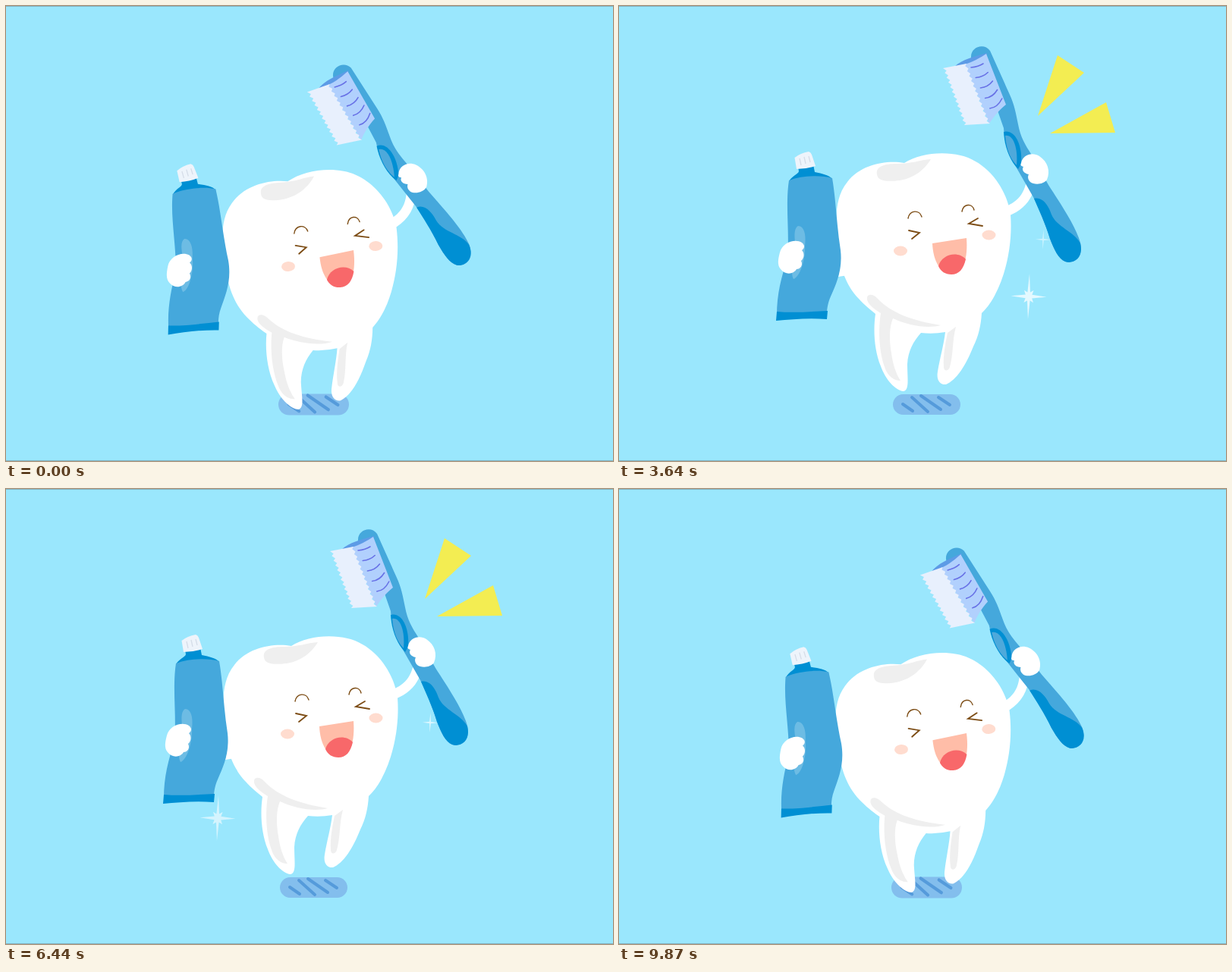
Recreate the animation shown at these times as an HTML page. Size 800 by 600 pixels, loop 9.94 s.

```html
<!DOCTYPE html>
<html lang="en">
<head>
<meta charset="utf-8">
<title>Jumping tooth</title>
<style>
  html, body { margin: 0; width: 100%; height: 100%; overflow: hidden; background: #9ae7fd; }
  svg { display: block; width: 100vw; height: 100vh; }
  .white { fill: #fff; }
  .blue { fill: #45a8dc; }
  .deep { fill: #008fd3; }
  .shade { fill: #efefef; }
  .line { fill: none; stroke: #7c4c14; stroke-width: 1.4; stroke-linecap: round; }
</style>
</head>
<body>
<svg viewBox="0 0 800 600">
  <path d="M0 .5H800M0 599.5H800" stroke="#83b3c2"/>

  <g id="shadow">
    <rect x="361" y="512" width="89" height="27" rx="13.5" fill="#83beed"/>
    <path d="M374 525l13 9M386 516l21 19M398 514l26 18M421 516l15 10" stroke="#559bdb" stroke-width="4" stroke-linecap="round"/>
  </g>

  <g id="brush">
    <path class="white" d="M505 266C526 259 533 248 537 232L548 238C543 259 530 271 508 279Z"/>
    <path class="blue" d="M464 68C463 54 481 48 489 59L515 117C521 130 523 141 526 156C529 173 536 184 543 195L566 236C580 258 602 290 608 312C612 331 599 340 588 337C579 333 574 322 568 307C562 287 554 268 546 252L522 210C511 193 508 177 507 161L499 138Z"/>
    <path class="deep" d="M547 254C558 251 566 263 570 275C577 292 600 297 608 313C613 332 599 341 588 337C579 333 574 322 568 307C562 287 553 268 547 254Z"/>
    <path class="deep" d="M507 166C522 162 532 184 530 208L526 215C514 203 508 184 507 166Z"/>
    <path fill="#4ea9db" d="M509 171C520 169 526 188 524 210C514 200 510 185 509 171Z"/>
    <path fill="#5d9be6" d="M442 80C453 70 467 67 485 62L482 78Z"/>
    <path fill="#b1d0fd" d="M455 77C467 74 476 68 484 63L510 130C500 138 494 146 488 155Z"/>
    <path id="bristles" fill="#e8f0fd"/>
    <path id="marks" fill="none" stroke="#6871e6" stroke-width="1.6" stroke-linecap="round"/>
    <path class="white" d="M530 207C532 196 545 192 554 198C565 205 569 218 564 229C559 236 547 236 542 232C538 228 539 224 540 222C534 221 530 216 533 212C529 211 529 209 530 207Z"/>
  </g>

  <g id="body">
    <path id="elbow" class="white" d="M293 335L289 357L302 355Z"/>
    <path class="white" d="M376 207C395 195 425 191 450 197C485 205 511 240 516 275C519 314 510 354 495 382C489 393 484 399 478 405C477 421 474 435 467 449C457 474 445 493 431 499C423 500 418 493 420 482C423 464 428 447 430 430Q414 433 398 431C388 442 381 455 380 472C380 492 383 506 375 508C364 507 351 492 345 475C336 453 335 426 338 406C333 402 323 394 316 386C298 367 291 344 288 315C285 282 284 253 301 232C319 208 354 203 376 207Z"/>
    <path class="shade" d="M340 222C338 211 351 208 366 208C386 208 397 203 411 202C404 214 390 227 370 230C353 232 341 231 340 222Z"/>
    <path class="shade" d="M327 387C326 379 335 379 341 386C359 405 387 415 424 421C407 426 380 421 361 412C356 424 356 441 359 458C361 473 365 485 371 494C362 494 354 488 350 476C342 453 342 424 345 405C335 399 328 393 327 387Z"/>
    <path class="shade" d="M433 431L444 423C439 441 441 458 436 476C434 482 428 482 428 476C427 461 430 446 433 431Z"/>
    <g id="face">
      <path class="line" d="M381 280C383 269 396 268 399 278M452 271C454 260 466 260 468 269"/>
      <path class="line" style="stroke-width:1.8" d="M382 296L396 299L386 307M473 280L461 287L479 290"/>
      <g fill="#ffdccf"><ellipse cx="371" cy="323" rx="9" ry="6.5"/><ellipse cx="487.5" cy="302" rx="9" ry="6.5"/></g>
      <path fill="#ffbda8" d="M413 313L458 306C460 333 454 352 439 353C423 353 414 336 413 313Z"/>
      <path fill="#f8686a" d="M421 343C425 328 446 322 457 334C454 347 448 354 438 354C430 354 424 350 421 343Z"/>
    </g>
  </g>

  <g id="tube">
    <path class="deep" d="M236 212L256 209L258 219C268 221 277 223 281 228L224 231C229 223 236 222 237 218Z"/>
    <path fill="#eef4fb" d="M231.5 200Q239 194 250 192Q253 193 254 196L259 211Q247 215 234 215Z"/>
    <path d="M238 201l2 9M244 199l2 9M250 198l2 8" stroke="#d5dde8" stroke-width="1.3"/>
    <path class="blue" d="M224 230C242 223 267 223 281 227C286 256 287 291 292 322C295 348 286 367 279 383C275 392 274 400 274 406L208 408C208 380 214 357 222 333C225 300 219 262 224 230Z"/>
    <path class="deep" d="M208 403C230 405 252 403 275 402L274 413C250 411 228 413 207 415Z"/>
    <path fill="#6dbce4" d="M236 290C244 290 247 302 245 316C246 335 238 358 230 360C225 351 231 331 232 311C231 301 231 293 236 290Z"/>
    <path class="white" d="M212 325C215 312 232 306 241 312C246 316 244 320 241 322C245 326 244 333 240 336C243 342 239 347 234 347C230 354 219 355 213 347C208 341 210 333 212 325Z"/>
  </g>

  <path id="rays" fill="#f3ed52" d="M552 145L578 65L613 88ZM568 168L642 127L654 167Z"/>
  <g id="stars" fill="#e9faff"></g>
</svg>
<script>
const STEP = 70, FRAMES = 142, TWINKLE = FRAMES / 4;
const $ = id => document.getElementById(id);

// Each part: dx, dy, turn in degrees; pivots are shared by all poses.
const pivots = { body: [400, 320], tube: [243, 304], brush: [536, 195] };
const ground = { body: [1, 23, -2.9], tube: [0, 16.5, -3.4], brush: [-14.5, 14, -8.6],
                 face: -4, shadow: 1.045, airborne: false };
const lift = { body: [0, 0, 0], tube: [0, 0, 0], brush: [0, 0, 0],
               face: 0, shadow: 1, airborne: true };
const peak = { ...lift, body: [0, -30, 0], tube: [0, -30, 0], brush: [0, -30, 0], shadow: .95 };

// x, y, radius, first and last step of the glow within one twinkle cycle
const stars = [
  [308, 130, 30, 0, 9.5], [198, 300, 11, 4, 13], [540, 383, 30, 11, 20],
  [559, 308, 13, 14.5, 24], [279, 434, 30, 18.5, 28], [388, 161, 14, 27, 34.5]
];

function starPath(r) {
  const big = r > 20, points = big ? 16 : 8;
  return 'M' + Array.from({ length: points }, (_, i) => {
    const a = i * 2 * Math.PI / points;
    const length = i % 2 ? r * (big ? .2 : .12) : i % 4 ? r * (big ? .38 : 1) : r;
    return [Math.sin(a) * length * .78, -Math.cos(a) * length].map(v => v.toFixed(1));
  }).join('L') + 'Z';
}

function zigzag(x0, y0, x1, y1, teeth, depth) {
  return Array.from({ length: teeth * 2 + 1 }, (_, i) => {
    const k = i / (teeth * 2);
    return [x0 + (x1 - x0) * k + (i % 2 ? depth : 0), y0 + (y1 - y0) * k];
  }).join('L');
}

$('bristles').setAttribute('d', 'M' + zigzag(427, 82, 455, 157, 12, 3.5) + 'L' + zigzag(489, 155, 458, 76, 12, -3) + 'Z');
$('marks').setAttribute('d', [0, 1, 2, 3, 4].map(i =>
  `M${464 + 6.2 * i} ${81 + 13.5 * i}q10 -1 16 ${-5 - 2 * i}`).join(''));

const glows = stars.map(([x, y, r]) => {
  const path = document.createElementNS('http://www.w3.org/2000/svg', 'path');
  path.setAttribute('d', starPath(r));
  path.setAttribute('transform', `translate(${x} ${y}) rotate(2)`);
  return $('stars').appendChild(path);
});

function setPose(pose) {
  for (const part in pivots) {
    const [dx, dy, turn] = pose[part];
    $(part).setAttribute('transform', `translate(${dx} ${dy}) rotate(${turn} ${pivots[part]})`);
  }
  $('face').setAttribute('transform', `translate(0 ${pose.face})`);
  $('shadow').setAttribute('transform', `translate(405.5 525.5) scale(${pose.shadow}) translate(-405.5 -525.5)`);
  for (const id of ['rays', 'elbow']) $(id).style.display = pose.airborne ? '' : 'none';
}

function draw(now) {
  const step = Math.floor(now / STEP) % FRAMES;
  const beat = step % 10, phase = step % TWINKLE;
  setPose(beat < 2 || beat > 7 ? ground : beat < 5 ? lift : peak);
  stars.forEach(([, , , from, to], i) => {
    const k = (phase - from) / (to - from);
    glows[i].style.opacity = k > 0 && k < 1 ? Math.sin(Math.PI * k) : 0;
  });
  requestAnimationFrame(() => draw(performance.now()));
}
draw(0);
</script>
</body>
</html>
```
